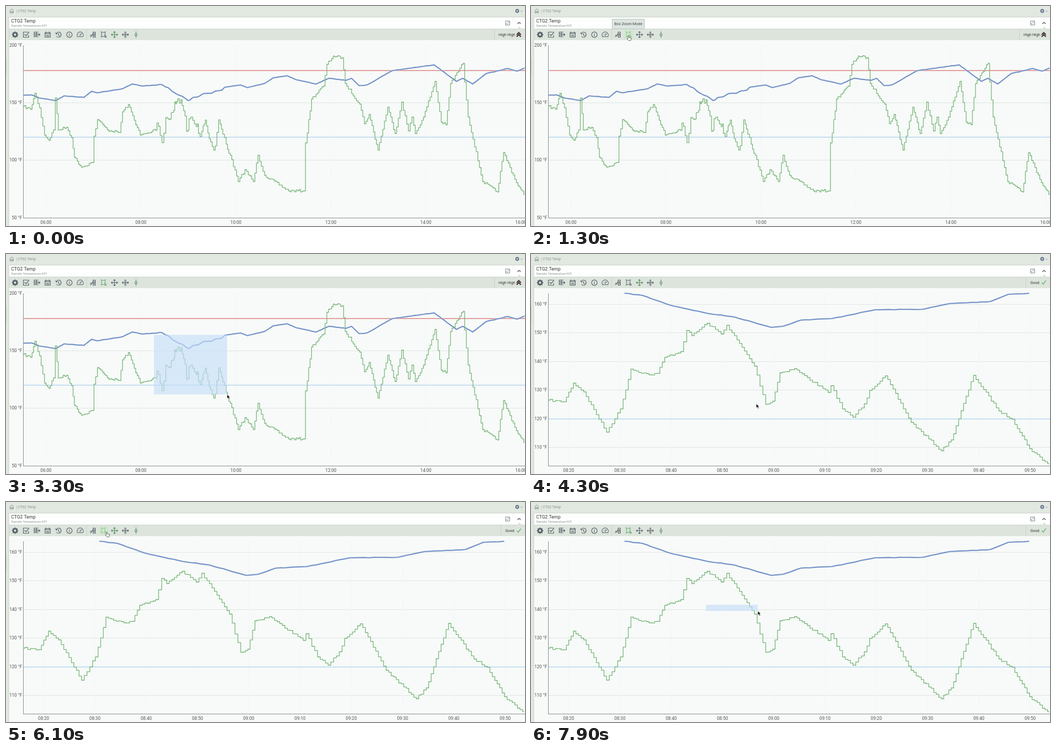
These frames come from a looping animation (1000x426 px, 8000 ms). An HTML page with a canvas:

```html
<!DOCTYPE html>
<html lang="en">
<meta charset="utf-8">
<title>Temperature trend</title>
<style>
  html, body { margin: 0; overflow: hidden; width: 1000px; height: 426px }
  canvas { display: block }
</style>
<canvas id="stage" width="1000" height="426"></canvas>
<script>
const c = document.getElementById('stage').getContext('2d');
const INK = '#566168';

// Turning points (x, y) before, inside and after the zoomed range.
// The inside part is in zoomed coordinates.
const temp = {
  before: [34,194, 49,200, 57,169, 66,197, 76,250, 84,260, 93,240, 97,178, 102,240,
    118,235, 128,255, 133,293, 147,312, 168,303, 171,252, 178,220, 197,240, 220,245,
    226,205, 237,191, 260,250, 280,245],
  inside: [34,283, 66,286, 84,250, 104,267, 148,345, 175,300, 195,223, 230,234, 246,231,
    260,200, 291,189, 303,148, 312,158, 342,134, 369,155, 380,138, 433,217, 455,291,
    468,285, 482,230, 510,222, 575,268, 581,255, 603,300, 623,316, 645,290, 655,264,
    685,236, 735,326, 793,381, 812,360, 855,235, 904,304, 930,320, 963,377, 998,406],
  after: [449,340, 462,317, 478,340, 487,289, 500,328, 546,358, 575,358, 579,265, 590,180,
    613,155, 620,113, 632,97, 649,100, 655,150, 683,190, 692,228, 701,210, 718,279,
    737,196, 751,247, 764,186, 777,242, 784,215, 790,247, 806,215, 828,146, 840,225,
    849,230, 858,150, 882,111, 892,215, 920,340, 948,360, 960,284, 985,342, 999,365]
};
const mean = {
  before: [34,173, 49,172, 64,178, 96,183, 112,174, 150,177, 165,165, 176,168, 225,160,
    243,151, 262,155, 300,152],
  inside: [180,76, 214,80, 268,99, 340,115, 392,122, 463,142, 485,140, 520,128, 580,125,
    663,108, 755,107, 807,96, 885,92, 920,78, 960,76],
  after: [452,153, 465,158, 498,150, 515,139, 542,135, 560,143, 598,151, 622,140, 655,144,
    666,140, 680,154, 695,153, 745,125, 825,114, 868,146, 880,140, 899,151, 925,131,
    967,121, 985,126, 999,120]
};

const unzoom = list => list.map((v, i) =>
  i % 2 ? 165.1 + (v - 97.5) * 0.402 : 284.6 + (v - 34) / 6.477);
const whole = s => [...s.before, ...unzoom(s.inside), ...s.after];

function linePath(list) {
  const p = new Path2D();
  for (let i = 0; i < list.length; i += 2) p.lineTo(list[i], list[i + 1]);
  return p;
}

// Joins the points with small sub-steps and seeded roughness.
function trend(list, width, noise, stepped) {
  const p = new Path2D();
  let [x, y] = list, last = y, seed = 7;
  const random = () => (seed = seed * 16807 % 2147483647) / 2147483647;
  p.moveTo(x, y);
  for (let i = 2; i < list.length; i += 2) {
    const dx = list[i] - x, dy = list[i + 1] - y, n = Math.max(1, Math.round(dx / width));
    for (let k = 1; k <= n; k++) {
      const next = y + dy * k / n + (k < n ? (random() * 2 - 1) * noise : 0);
      if (stepped) {
        const mid = x + dx * (k - .5) / n;
        p.lineTo(mid, last);
        p.lineTo(mid, next);
      }
      p.lineTo(x + dx * k / n, next);
      last = next;
    }
    x += dx; y += dy;
  }
  return p;
}

const views = {
  full: {
    mean: trend(whole(mean), 5, .4), temp: trend(whole(temp), 3, 2.5, true),
    low: 254, high: 125,
    degree: 200, degrees: 50, top: 76, gapY: 111.33, rows: 4,
    minute: 360, minutes: 120, left: 77, gapX: 183, columns: 6
  },
  zoomed: {
    mean: trend(mean.inside, 9, .5), temp: trend(temp.inside, 5, 2, true),
    low: 319.4,
    degree: 160, degrees: 10, top: 97.5, gapY: 55.4, rows: 6,
    minute: 500, minutes: 10, left: 72.5, gapX: 98.8, columns: 10
  }
};

function rect(x, y, w, h, color) { c.fillStyle = color; c.fillRect(x, y, w, h); }
function text(s, x, y, size, color = '#555', align = 'left') {
  c.font = `${size}px Roboto, sans-serif`;
  c.textAlign = align; c.textBaseline = 'middle';
  c.fillStyle = color; c.fillText(s, x, y);
}
function stroke(path, color, width = 1) {
  c.strokeStyle = color; c.lineWidth = width; c.stroke(path);
}
function line(x1, y1, x2, y2, color, width = 1, dash = []) {
  c.setLineDash(dash);
  stroke(linePath([x1, y1, x2, y2]), color, width);
  c.setLineDash([]);
}
function icon(d, x, y, color = INK, width = 1.2, fill) {
  const p = new Path2D(d);
  c.save(); c.translate(x, y);
  if (fill) { c.fillStyle = fill; c.fill(p); }
  stroke(p, color, width);
  c.restore();
}
function gear(x, y, r, color = INK) {
  c.save(); c.translate(x, y);
  c.beginPath(); c.arc(0, 0, r * 0.58, 0, 7);
  c.strokeStyle = color; c.lineWidth = r * 0.45; c.stroke();
  for (let i = 0; i < 8; i++) {
    c.rotate(Math.PI / 4);
    rect(-r * 0.2, -r, r * 0.4, r * 0.4, color);
  }
  c.restore();
}

const tools = [
  'M4-5H-5V5H5V1M-3-1L0 2L6-5',
  'M3-5H-5V4H3M-5-2H3M-5 1H2M-1-5V4M1 0H6M4-2L6 0L4 2',
  'M-5-4H5V5H-5ZM-5-2H5M-3-6V-3M3-6V-3M-3 1H3M-3 3H3',
  'M-4-3A5 5 0 1 1-4 3M-6-4L-4-1L-2-3M0-3V1L3 2',
  'M5.3 0A5.3 5.3 0 1 1-5.3 0A5.3 5.3 0 1 1 5.3 0M0-1V3M0-3.3V-2',
  'M-5 4A6 6 0 1 1 5 4ZM-1 2L3-2M-3 0H-2M0-3V-2',
];
const curveIcon = 'M-5 4C-1 4-2-1 2-3M1-5H5V5H1ZM2-2H5M2 0H5M1 2H5M-5 1H-1';
const boxIcon = 'M-4-4.5H3V3.5H-4ZM-5.5-5.5H-3M2-5.5H4.5M-5.5 4.5H-3M1 0L5 5M5 2V5H2';
const splitIcon = 'M-1-6V6M1-6V6M-6 0H-1M1 0H6M-4-2L-6 0L-4 2M4-2L6 0L4 2';
const panIcon = 'M0-6V6M-6 0H6M-2-4L0-6L2-4M-2 4L0 6L2 4M-4-2L-6 0L-4 2M4-2L6 0L4 2';
const pinIcon = 'M0-6V-2M0 2V6M2 0A2 2 0 1 1-2 0A2 2 0 1 1 2 0';

function drawHeader({ hover, zoomed, boxMode }) {
  rect(0, 0, 1000, 426, '#e1e8e0');
  rect(0, 102, 1, 30, '#c3d9bf');
  icon('M-4 0L0-4L4 0M-3 0V4H-1V1H1V4H3V0', 11, 9.5, '#7e878c', 1);
  text('|', 20, 10, 6.5, '#999');
  text('CTG2 Temp', 23, 10, 6.6, '#888f90');
  gear(985, 9.5, 4, '#66738a');
  icon('M-1.5-.5L0 1L1.5-.5', 993.5, 10, '#777', 1);

  rect(6, 21, 994, 24, '#cbd4cc');
  rect(6, 22, 994, 22, '#fdfefd');
  text('CTG2 Temp', 10, 29, 9, '#333');
  text('Sample Temperature KPI', 10, 37.8, 6.2, '#8a8f90');
  icon('M-4-4H4V4H-4ZM0-2H2V0M-2 0V2H0', 966.5, 33, '#7c8791', 1);
  icon('M-3 1.5L0-1.5L3 1.5', 988.5, 33, '#444', 1.2);
  icon('M-5 0L0-5L5 0Z', 989, 45, '#dce4dc', .5, '#dce4dc');

  rect(6, 45, 994, 21, '#dce4dc');
  gear(17.5, 55.5, 6);
  tools.forEach((d, i) => icon(d, 38.5 + i * 20.9, 55.5));
  icon(curveIcon, 167, 55.5);
  if (hover) rect(180, 47, 17, 17, '#d2e6cf');
  icon(boxIcon, 188, 55.5, hover ? '#8ac58b' : boxMode ? '#5fa364' : INK, 1);
  icon(panIcon, 209, 55.5, boxMode ? INK : '#568a5c', 1.1);
  icon(splitIcon, 230, 55.5, INK, 1.1);
  icon(pinIcon, 250.5, 55.5, '#588560', 1.1);

  const edge = zoomed ? 953.5 : 941.5;
  for (const x of [155.5, edge]) line(x, 46, x, 65, '#b4beb6', 1, [1, 1]);
  if (zoomed) {
    text('Good', 962, 56, 7.3, '#333');
    icon('M-4 0L-1 3L4-4', 988, 55.5, '#75b877', 1.7);
  } else {
    text('High High', 949, 56, 7.3, '#333');
    icon('M-4 0L0-4L4 0M-4 4L0 0L4 4', 988, 55.5, '#333', 2.2);
    icon('M-4 2L0-2L4 2', 988, 55.5, '#c9595c', 1);
  }
}

function drawChart(v) {
  rect(6, 66, 994, 360, '#f7faf8');
  line(5.5, 21, 5.5, 426, '#cbd5cc');
  for (let i = 0; i < v.rows; i++) {
    const y = v.top + i * v.gapY, row = Math.floor(y) + .5;
    if (y > 80 && y < 405) line(34, row, 1000, row, '#dfe4e1');
    text(v.degree - i * v.degrees + ' °F', 31, y, 8.6, '#555', 'right');
  }
  const pad = n => String(n).padStart(2, '0');
  for (let i = 0; i < v.columns; i++) {
    const m = v.minute + i * v.minutes, x = v.left + i * v.gapX;
    line(x, 76, x, 410, '#eef2f0', 1, [1, 1]);
    text(pad(Math.floor(m / 60)) + ':' + pad(m % 60), x, 419.8, 8.6, '#555', 'center');
  }
  c.save();
  c.beginPath(); c.rect(34, 74, 966, 336); c.clip();
  line(34, v.low, 1000, v.low, '#b5d3f2', 1.5);
  if (v.high) line(34, v.high, 1000, v.high, '#dc7c80', 1.4);
  c.lineJoin = 'round';
  stroke(v.mean, '#c9d6ec', 3);
  stroke(v.mean, '#6a89c2', 1.7);
  stroke(v.temp, '#74b275', 1.3);
  c.restore();
  line(33.5, 76, 33.5, 410, '#858b89');
  line(33, 410.5, 1000, 410.5, '#858b89');
}

// Pointer stops: time, x, y
const track = [
  [200, 250, 430], [1000, 188, 57], [1700, 188, 57], [2300, 289, 163], [2500, 285, 157],
  [2600, 285, 157], [3300, 426, 272], [3600, 434, 290], [5100, 434, 290], [6000, 196, 58],
  [6300, 190, 57], [6900, 190, 57], [7600, 337, 199], [7900, 437, 211], [8000, 450, 222]];

function pointerAt(t) {
  const i = track.findIndex(k => k[0] > t);
  if (i < 1) return track[0].slice(1);
  const [t0, x0, y0] = track[i - 1], [t1, x1, y1] = track[i];
  const u = (t - t0) / (t1 - t0), e = u * u * (3 - 2 * u);
  return [x0 + (x1 - x0) * e, y0 + (y1 - y0) * e];
}

function draw(t) {
  const [x, y] = pointerAt(t);
  const hover = y < 66 && x < 200 && x > 179;
  const zoomed = t >= 3800;
  const boxMode = t >= 1200 && t < 3800 || t >= 6600;
  drawHeader({ hover, zoomed, boxMode });
  drawChart(zoomed ? views.zoomed : views.full);

  const start = t >= 2600 && t < 3800 ? [285, 156.5] : t >= 7600 ? [337, 199] : null;
  if (start) rect(...start, x - start[0], y - start[1], 'rgba(197,222,251,.64)');

  if (hover && (t >= 1000 && t < 1700 || t >= 6500)) {
    rect(156, 25, 63, 20, '#bac5bf');
    rect(157, 26, 61, 18, '#dce5e0');
    text('Box Zoom Mode', 187.5, 35, 7.4, '#444', 'center');
  }
  if (hover)
    icon('M-1 1Q0-1 1 1V4L5 5V8L4 10H0L-3 6L-1 6Z', x, y, '#444', .8, '#fff');
  else if (y < 426)
    icon('M0 0V8L2 6.3L3.5 9.5L5 8.8L3.6 5.8H6Z', x, y, '#fff', .6, '#111');
}

function tick() {
  draw(Math.floor(performance.now() % 8000 / 100) * 100);
  requestAnimationFrame(tick);
}
tick();
</script>
</html>
```
